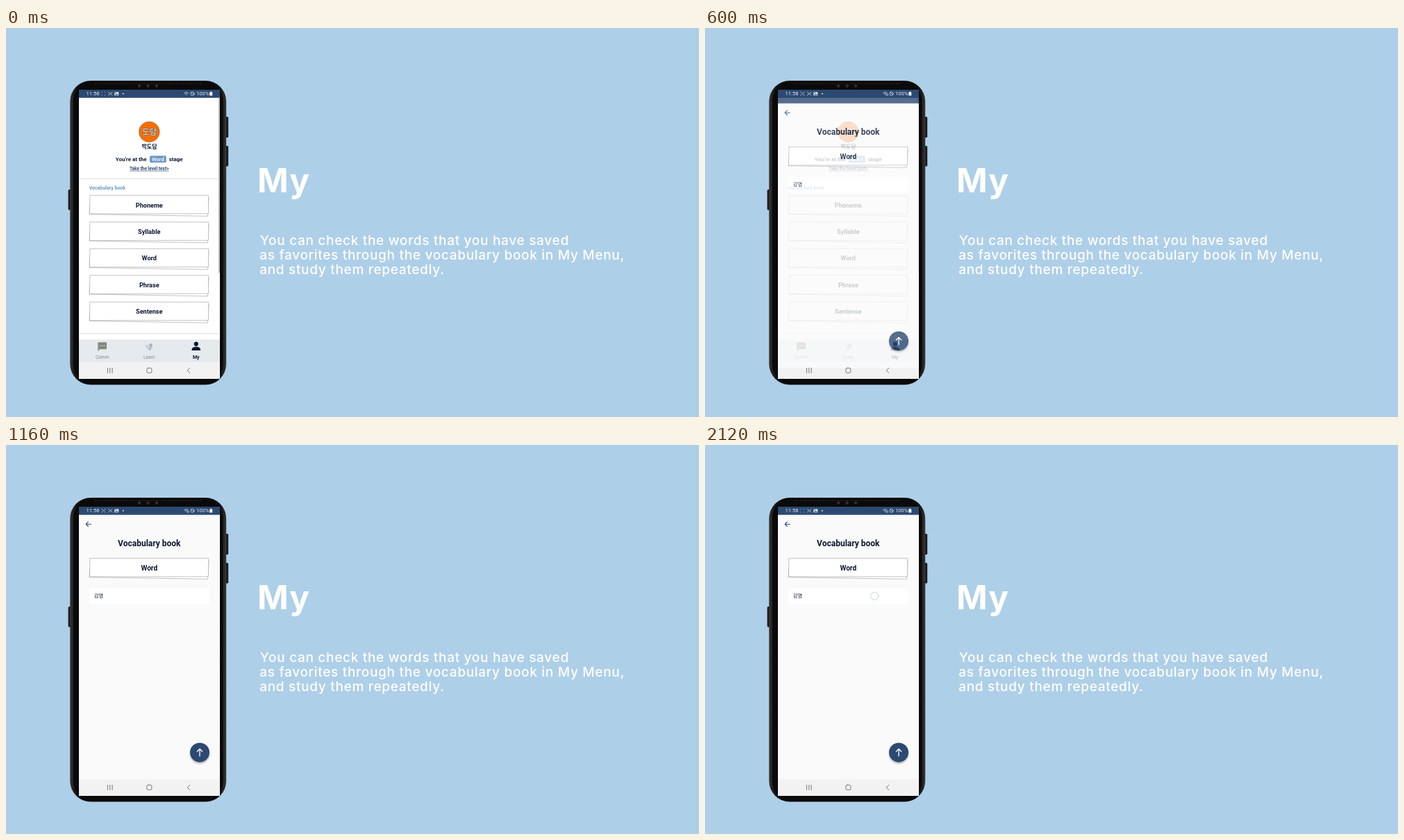
These frames come from a looping animation (998 px wide and 561 px high, 2.2 s). An HTML page:

```html
<!DOCTYPE html>
<html lang="en">
<head>
<meta charset="utf-8">
<title>My menu</title>
<style>
  html, body { margin: 0; width: 100%; height: 100%; overflow: hidden; background: #aecfe8; }
  svg { display: block; width: 100%; height: 100%; }
  text { font-family: Roboto, "Noto Sans CJK KR", "Noto Sans CJK", sans-serif; white-space: pre; }
  .mid { text-anchor: middle; }
  .b { font-weight: 700; fill: #0b1733; }
  .head { font: 700 48px Inter, sans-serif; letter-spacing: 1px; fill: #fff; }
  .copy { font: 500 19px Inter, sans-serif; letter-spacing: .7px; fill: #fff; }
  .line { fill: none; stroke-linecap: round; stroke-linejoin: round; }
  .sys { font-size: 7.6px; fill: #e3e9f1; }
  .tab { font-size: 6.6px; fill: #858a90; }

  .home, .book, .scan, .dots, .link, .tap { animation: 2.2s step-end infinite; }
  .home { animation-name: home; }
  .book { animation-name: book; }
  .scan { animation-name: scan; }
  .dots { animation-name: dots; }
  .link { animation-name: link; }
  .tap1 { animation-name: tap1; }
  .tap2 { animation-name: tap2; }

  @keyframes home { 0% { opacity: 1 } 30.9%, 100% { opacity: 0 } }
  @keyframes book {
    0% { opacity: 0; transform: translateY(8px) }
    27.25% { opacity: .8; transform: translateY(8px) }
    30.9% { opacity: 1; transform: translateY(2px) }
    34.5%, 100% { opacity: 1; transform: none }
  }
  @keyframes scan {
    0%, 30.9%, 59.98%, 89.05%, 100% { opacity: 0 }
    23.6%, 52.7%, 81.8% { opacity: 1 }
  }
  @keyframes dots {
    0%, 30.9%, 59.98%, 89.05%, 100% { opacity: 1 }
    23.6%, 52.7%, 81.8% { opacity: 0 }
  }
  @keyframes link { 0% { opacity: 0 } 12.7%, 100% { opacity: 1 } }
  @keyframes tap1 { 0%, 27.25%, 100% { opacity: 0 } 19.98% { opacity: 1 } 23.6% { opacity: .75 } }
  @keyframes tap2 { 0% { opacity: 0 } 92.7% { opacity: .5 } 96.3%, 100% { opacity: 1 } }
</style>
</head>
<body>
<svg viewBox="0 0 998 561" preserveAspectRatio="none">
  <defs>
    <linearGradient id="rim">
      <stop offset="0" stop-color="#3a3a3a"/>
      <stop offset=".012" stop-color="#292827"/>
      <stop offset=".035" stop-color="#181716"/>
      <stop offset=".055" stop-color="#0b0b0b"/>
      <stop offset=".945" stop-color="#0b0b0b"/>
      <stop offset=".965" stop-color="#181716"/>
      <stop offset=".988" stop-color="#292827"/>
      <stop offset="1" stop-color="#3a3a3a"/>
    </linearGradient>
    <clipPath id="screen"><rect x="105" y="89" width="203" height="416.5"/></clipPath>
    <filter id="soft" x="-30%" y="-30%" width="160%" height="170%"><feGaussianBlur stdDeviation="1.5"/></filter>
    <!-- sketchy card, centred on 0,0 -->
    <g id="card" class="line" stroke="#9a9a9a" stroke-width=".6">
      <path d="M-85.4 2L-86.2 13.4L84 16.2L85.8 -10" fill="#fff"/>
      <path d="M-85 -13.8L85.4 -13.8L85.2 12.6L-85.6 12.8Z" fill="#fff"/>
    </g>
  </defs>

  <rect width="998" height="561" fill="#aecfe8"/>

  <g id="phone">
    <g fill="#1c1c1c">
      <rect x="315" y="128" width="5.2" height="30" rx="1.5"/>
      <rect x="315" y="170" width="5.2" height="29.5" rx="1.5"/>
      <rect x="89.6" y="233" width="5" height="29.5" rx="1.5"/>
    </g>
    <rect x="92.2" y="76" width="225" height="438.6" rx="30" fill="url(#rim)"/>
    <rect x="97" y="78.4" width="215.4" height="433.8" rx="26" fill="#0a0a0a"/>
    <path d="M128 80.4H281" stroke="#4a2e24" stroke-width=".9" stroke-dasharray="2 2.2"/>
    <g fill="#2e2e30"><circle cx="192" cy="83.5" r="2.2"/><circle cx="204.5" cy="83.5" r="2.2"/><circle cx="217" cy="83.5" r="2.2"/></g>
  </g>

  <g clip-path="url(#screen)">
    <rect x="105" y="89" width="203" height="417" fill="#fff"/>

    <g class="home">
      <rect x="105" y="89" width="203" height="11.7" fill="#2c4972"/>
      <circle cx="206.3" cy="149.8" r="14.9" fill="#f56e06" stroke="#8f7550" stroke-width=".6"/>
      <text class="mid" x="206.5" y="154" font-size="11.5" fill="#e8f3f6" stroke="#5e5a54" stroke-width="1" paint-order="stroke">도담</text>
      <text class="mid" x="206.5" y="173.6" font-size="8" font-weight="700" fill="#0b1733">박도담</text>
      <text class="b" x="157.8" y="192.3" font-size="8">You're at the</text>
      <rect x="207" y="184.2" width="23.8" height="9.8" rx="1.5" fill="#6c9ac1"/>
      <text class="mid" x="218.9" y="191.9" font-size="7.5" font-weight="500" fill="#fff">Word</text>
      <text class="b" x="234.7" y="192.3" font-size="8">stage</text>
      <text class="b mid" x="206.3" y="205.2" font-size="6.5" style="fill:#2c4972">Take the level test&gt;</text>
      <path d="M178 206.2H234.7" stroke="#2c4972" stroke-width=".6"/>
      <path d="M105 217.3H306M105 440.8H306" stroke="#dcdcdc" stroke-width="1"/>
      <text x="119.7" y="232.8" font-size="6.95" font-weight="700" fill="#6c9ac1">Vocabulary book</text>
      <g id="cards"></g>
      <rect x="306" y="100.7" width="2" height="252.5" fill="#bcbcbc"/>

      <rect x="105" y="449.3" width="203" height="33" fill="#e5eaed"/>
      <path d="M133.7 453.3H143.7Q145 453.3 145 454.6V462Q145 463.3 143.7 463.3H135.2L132.4 466V454.6Q132.4 453.3 133.7 453.3Z" fill="#85867f"/>
      <g fill="#e5eaed"><circle cx="135.9" cy="458.3" r=".75"/><circle cx="138.7" cy="458.3" r=".75"/><circle cx="141.5" cy="458.3" r=".75"/></g>
      <path d="M206.2 456.2Q208.3 453.8 210.3 455.7Q212 457.8 210.2 460.4Q209.2 461.8 208.9 463.7Q207.6 465.8 205.7 464.2L202.6 461.3Q204.8 462 206.1 460.6Z" fill="#b5bfc7"/>
      <path class="line" d="M201.6 457.6Q201.9 460 203.4 461.2M204 457Q204.1 458.7 205.2 459.6M207.5 457.2Q209.4 456.3 209.3 458.6" stroke="#8b97a1" stroke-width=".7"/>
      <circle cx="273.8" cy="455.7" r="3.1" fill="#0b1733"/>
      <path d="M267.6 465V463.2C267.6 460.8 271.4 459.7 273.8 459.7S280 460.8 280 463.2V465Z" fill="#0b1733"/>
      <text class="tab mid" x="138.7" y="476.7">Comm</text>
      <text class="tab mid" x="206.2" y="476.7">Learn</text>
      <text class="b mid" x="273.8" y="477" font-size="7">My</text>
      <rect x="105" y="482.2" width="203" height="24" fill="#f2f2f2"/>
      <circle class="tap tap1 line" cx="258.5" cy="338.5" r="5.6" stroke="#d6dadd" stroke-width="1"/>
    </g>

    <g class="book">
      <rect x="105" y="89" width="203" height="417" fill="#fafafa"/>
      <rect x="105" y="89" width="203" height="11.7" fill="#2c4972"/>
      <path class="line" d="M122.3 114.2H115.2M118.4 110.9L115.1 114.2L118.4 117.5" stroke="#2c4972" stroke-width="1.1"/>
      <text class="b mid" x="206.3" y="145.8" font-size="12">Vocabulary book</text>
      <use href="#card" x="206.3" y="177.2"/>
      <text class="b mid" x="206.3" y="180.9" font-size="10.1">Word</text>
      <rect x="119.8" y="206.5" width="173" height="22.8" fill="#fff"/>
      <text x="127" y="220.4" font-size="7.2" font-weight="500" fill="#0b1733">감염</text>
      <circle cx="279" cy="445.4" r="13.6" fill="#000" opacity=".35" filter="url(#soft)"/>
      <circle cx="279" cy="443.4" r="14" fill="#2c4972"/>
      <path class="line" d="M279 448.7V438.5M275.3 442L279 438.3L282.7 442" stroke="#fff" stroke-width="1.3"/>
      <rect x="105" y="482.2" width="203" height="24" fill="#f2f2f2"/>
      <circle class="tap tap2 line" cx="244.3" cy="217.8" r="5.6" stroke="#c5d3e2" stroke-width="1"/>
    </g>

    <!-- system icons stay put while pages move -->
    <g id="system">
      <text class="sys" x="115.6" y="97.4">11:58</text>
      <g class="line" stroke="#d5deea" stroke-width=".8">
        <path class="dots" d="M138 92.4h.2M142.3 92.4h.2M138 97h.2M142.3 97h.2"/>
        <path class="scan" d="M137.8 92.3l1.2 1M143 92.3l-1.2 1M137.8 97.2l1.2 -1M143 97.2l-1.2 -1M139.7 94.7h1.4"/>
        <path d="M147.7 92.2l1.8 2.4l-1.8 2.6M153 92.2l-1.7 2M153 97.2l-1.7 -1.8M150.2 94.7h.8"/>
        <path d="M256.6 93.5Q259.5 91 262.4 93.5M257.8 94.9Q259.5 93.6 261.2 94.9M259.3 96.4h.4"/>
        <path class="link" d="M261.6 95.2v2.2M263.2 97.4v-2.2"/>
        <circle cx="268.5" cy="94.7" r="2.6"/>
        <path d="M266.8 92.9L270.3 96.5"/>
      </g>
      <path d="M156.3 92.4H162.2V97.3H156.3Z" fill="#e3e9f1"/>
      <path d="M157 96.6L158.7 94.7L159.7 95.6L160.5 94.8L161.6 96.6ZM157 93.1H159V93.8H157Z" fill="#2c4972"/>
      <circle cx="168.8" cy="94.8" r="1" fill="#e3e9f1"/>
      <text class="sys" x="274" y="97.4">100%</text>
      <path d="M293.2 92.6H294.3V91.8H296.2V92.6H297.3V97.6H293.2Z" fill="#eef2f6"/>
      <g class="line" stroke="#686868" stroke-width=".9">
        <path d="M146.5 490.4V497.4M149.8 490.4V497.4M153.1 490.4V497.4"/>
        <rect x="202.8" y="490.4" width="7.1" height="7" rx="2"/>
        <path d="M264.7 490.3L261.2 493.9L264.7 497.5"/>
      </g>
    </g>
  </g>

  <text class="head" x="362" y="237">My</text>
  <text class="copy" x="365.8" y="312.8">You can check the words that you have saved</text>
  <text class="copy" x="365.2" y="333.7">as favorites through the vocabulary book in My Menu,</text>
  <text class="copy" x="365.2" y="354.6">and study them repeatedly.</text>
</svg>
<script>
  const stages = ["Phoneme", "Syllable", "Word", "Phrase", "Sentense"];
  document.getElementById("cards").innerHTML = stages.map((name, i) => {
    const y = 255.2 + i * 38.45;
    return `<use href="#card" x="206.3" y="${y}"/>
      <text class="b mid" x="206.3" y="${y + 3.3}" font-size="9.15">${name}</text>`;
  }).join("");
</script>
</body>
</html>
```
